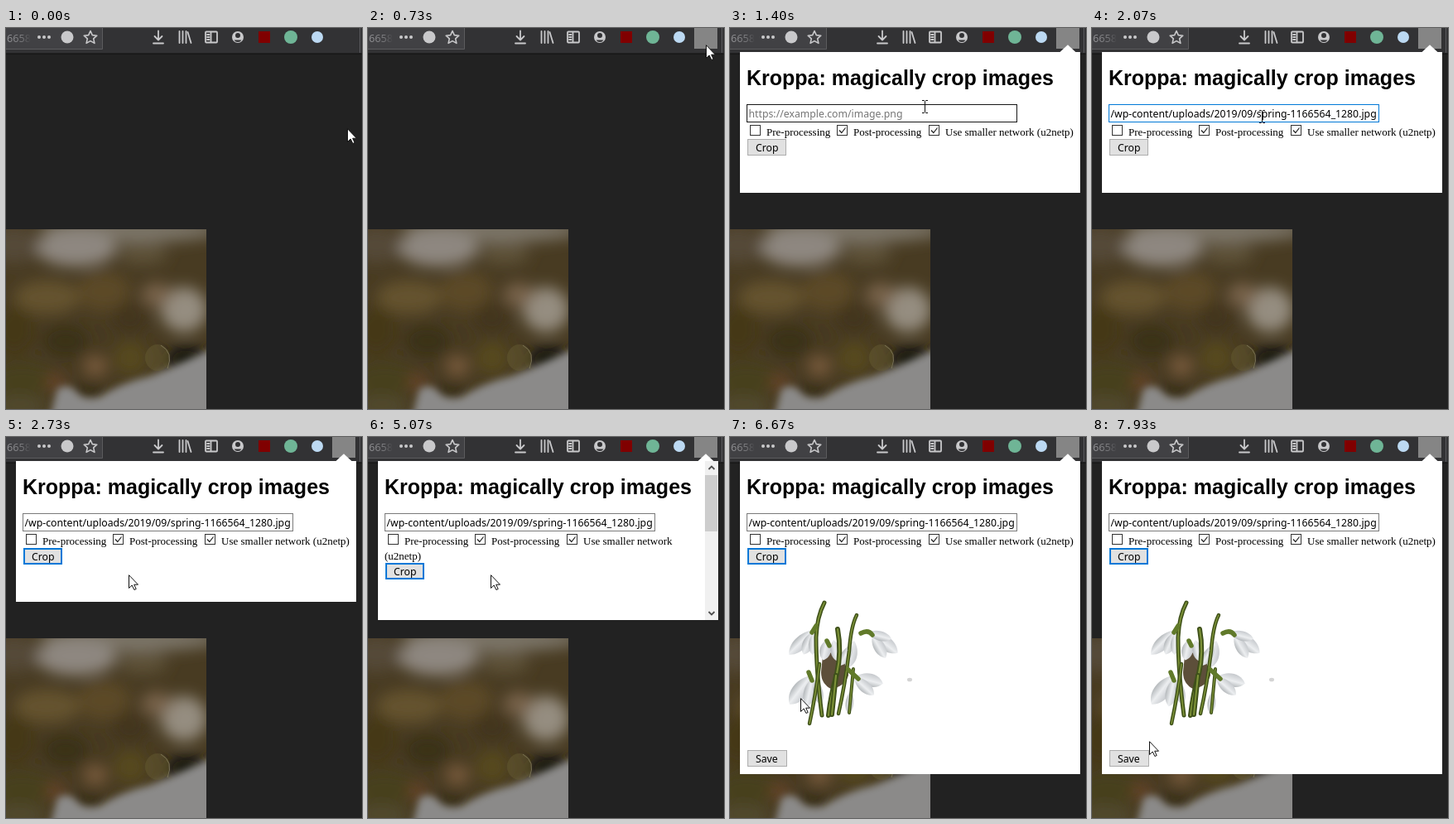
An HTML page for the animation above (8 s loop, 430 by 460 pixels).

```html
<!DOCTYPE html>
<html lang="en">
<head>
<meta charset="utf-8">
<title>Crop popup</title>
<style>
  html, body { margin: 0; width: 100%; height: 100%; overflow: hidden; background: #222; }
  svg { display: block; width: 430px; height: 460px; }
  .ui { font: 12.28px "Noto Sans", "Open Sans", sans-serif; }
  .label { font: 13px "Liberation Serif", "Times New Roman", serif; }
  .title { font: bold 25px "Liberation Sans", Arial, sans-serif; }
  .icon { fill: none; stroke: #c9c9cb; stroke-width: 1.8; stroke-linecap: round; stroke-linejoin: round; }
</style>
</head>
<body>
<svg viewBox="0 0 430 460" xmlns="http://www.w3.org/2000/svg">
  <defs>
    <linearGradient id="fade" gradientUnits="userSpaceOnUse" x1="4" x2="30" y1="0" y2="0">
      <stop offset="0" stop-color="#8d8d90"/><stop offset=".6" stop-color="#77777a"/>
      <stop offset="1" stop-color="#414144"/>
    </linearGradient>
    <linearGradient id="petal" x1="0" x2="1" y1="0" y2="0">
      <stop offset="0" stop-color="#b4b8bb"/><stop offset=".45" stop-color="#eceef0"/>
      <stop offset="1" stop-color="#c6c9cd"/>
    </linearGradient>
    <filter id="blur" x="-50%" y="-50%" width="200%" height="200%"><feGaussianBlur stdDeviation="9"/></filter>
    <filter id="soft" x="-50%" y="-50%" width="200%" height="200%"><feGaussianBlur stdDeviation="5"/></filter>
    <clipPath id="photoBox"><rect y="243" width="242" height="217"/></clipPath>
  </defs>

  <rect width="430" height="460" fill="#222"/>

  <g clip-path="url(#photoBox)">
    <rect y="243" width="242" height="217" fill="#483b22"/>
    <g id="blobs" filter="url(#blur)"></g>
    <path d="M52 475L62 436Q74 428 84 438Q92 450 112 446Q140 428 175 420Q210 406 255 384V475Z" fill="#8b8a89" filter="url(#soft)"/>
    <ellipse cx="183" cy="398" rx="15" ry="16" fill="#6b6238" opacity=".4"/>
    <path d="M187 383Q203 392 195 411" fill="none" stroke="#8a8465" opacity=".7"/>
  </g>

  <g id="toolbar">
    <rect width="430" height="31" fill="#323234"/>
    <rect y="30.5" width="430" height="1" fill="#0e0e0f"/>
    <path d="M0 25.500H116.500V0" fill="#414144" stroke="#5b5b5e"/>
    <rect width="116" height="25" fill="#414144"/>
    <text x="1" y="17" class="ui" style="font-size:12.700px" fill="url(#fade)">6658</text>
    <g fill="#c9c9cb"><circle cx="40" cy="11" r="2"/><circle cx="46" cy="11" r="2"/><circle cx="52" cy="11" r="2"/></g>
    <circle cx="74" cy="11" r="7.5" fill="#c9c9cb"/>
    <path class="icon" style="stroke-width:1.600" d="M102 3.500L104.300 8.600 109.800 9.200 105.700 12.900 106.900 18.400 102 15.600 97.100 18.400 98.300 12.900 94.200 9.200 99.700 8.600Z"/>
    <path class="icon" d="M184 3.500V14M179.500 10L184 14.500 188.500 10M178 18.500H190"/>
    <path class="icon" d="M209.500 4V18M213.500 4V18M217.500 4V18M219.500 5L223.500 18"/>
    <path class="icon" d="M242 4.500H254Q255 4.500 255 5.500V16.500Q255 17.500 254 17.500H242Q241 17.500 241 16.500V5.500Q241 4.500 242 4.500ZM247.500 5V17M243 8H245.500M243 11H245.500M243 14H245.500"/>
    <circle cx="280" cy="11" r="7" fill="#c9c9cb"/>
    <path d="M280 6A3 3 0 0 1 280 12A3 3 0 0 1 280 6M275.500 14.500H284.500Q283 17 280 17Q277 17 275.500 14.500" fill="#323234"/>
    <rect x="305" y="4" width="14" height="14" fill="#800000"/>
    <circle cx="344" cy="11" r="8" fill="#6fb596"/>
    <circle cx="376" cy="11" r="7" fill="#bcd9f2"/>
    <rect id="tool" x="394" width="28" height="25"/>
    <path d="M427.500 0V30" stroke="#5c5c5f"/>
  </g>

  <g id="panel">
    <path d="M397.500 30L408 20.200 418.500 30Z" fill="#fff"/>
    <rect id="sheet" y="29" fill="#fff"/>
    <text x="20" y="69" class="title">Kroppa: magically crop images</text>
    <rect id="field" x="20.500" y="92.500" width="326" height="21" fill="#fff"/>
    <text id="value" x="22.500" y="108" class="ui"></text>
    <path id="caret" d="M23.500 96V111" stroke="#000"/>
    <g id="checks"></g>
    <text x="44" y="130" class="label">Pre-processing</text>
    <text x="149" y="130" class="label">Post-processing</text>
    <text x="260" y="130" class="label">Use smaller network<tspan id="tail"> (u2netp)</tspan></text>
    <text id="wrapped" x="20" y="148" class="label">(u2netp)</text>
    <g id="crop"><rect/><text x="31" y="149" class="ui">Crop</text></g>
    <g id="result">
      <g id="flowers"></g>
      <g id="save"><rect/><text x="31" y="393" class="ui">Save</text></g>
    </g>
    <g id="scroll">
      <rect x="407" y="29" width="16" height="192" fill="#f0f0f0"/>
      <rect x="407" y="46" width="15" height="68" fill="#cdcdcd"/>
      <path d="M411.500 39L415 35.500 418.500 39M411.500 211L415 214.500 418.500 211" fill="none" stroke="#505050" stroke-width="1.800"/>
    </g>
  </g>

  <path id="arrow" d="M.5 .7V16.500L4.200 13 6.900 18.500 9.200 17.500 6.700 12.200H11.500Z" fill="#fff" stroke="#111"/>
  <path id="beam" d="M-3.500 -7.500H-1L0 -6.500 1 -7.500H3.500M0 -6.500V6.500M-3.500 7.500H-1L0 6.500 1 7.500H3.500" fill="none" stroke="#111"/>
</svg>

<script>
const $ = id => document.getElementById(id);
const set = (el, attrs) => { for (const a in attrs) el.setAttribute(a, attrs[a]); };
const show = (id, on) => set($(id), { visibility: on ? 'inherit' : 'hidden' });
const add = (parent, tag, attrs) => {
  const el = document.createElementNS('http://www.w3.org/2000/svg', tag);
  set(el, attrs);
  parent.appendChild(el);
};

// Blurred background photo: x, y, rx, ry, colour
[
  [10, 262, 30, 22, '#554a39'], [150, 244, 110, 15, '#7c7467'], [85, 266, 48, 22, '#8e8780'],
  [165, 272, 30, 14, '#5d5138'], [50, 325, 40, 20, '#65522f'], [118, 318, 32, 24, '#5b4926'],
  [150, 350, 22, 20, '#42361a'], [215, 340, 28, 27, '#958d80'], [182, 322, 18, 14, '#79644b'],
  [10, 365, 26, 30, '#453719'], [72, 378, 28, 20, '#3a3015'], [108, 408, 14, 12, '#7a5c3c'],
  [150, 398, 20, 20, '#57491f'], [218, 400, 24, 17, '#18130b'], [20, 425, 40, 22, '#47401b'],
  [60, 428, 12, 9, '#6c442b'], [100, 438, 18, 8, '#322b15'], [15, 458, 35, 14, '#514a2e']
].forEach(([cx, cy, rx, ry, fill]) => add($('blobs'), 'ellipse', { cx, cy, rx, ry, fill }));

[24, 129, 240].forEach((x, i) => {
  add($('checks'), 'rect', { x: x + .5, y: 117.5, width: 12, height: 12, fill: '#fff', stroke: '#333' });
  if (i) add($('checks'), 'path', { d: `M${x + 3} 123.500l2.800 3 4.700 -6`, fill: 'none', stroke: '#222', 'stroke-width': 1.2 });
});

// Cut-out flowers
const flowers = $('flowers');
add(flowers, 'path', { d: 'M112 264Q126 256 141 262L143 288Q138 302 122 304Q110 298 110 284Z', fill: '#5d4f3a' });
// Petals: base x, base y, length, width, angle
[
  [101, 233, 42, 16, 45], [101, 235, 30, 14, 24], [101, 236, 27, 11, 3],
  [118, 244, 26, 14, 12], [125, 245, 26, 12, -10], [150, 246, 34, 16, 14], [148, 250, 30, 12, 30],
  [171, 236, 40, 17, -52], [172, 239, 32, 14, -30], [166, 236, 30, 12, -75],
  [99, 288, 44, 20, 38], [100, 291, 35, 15, 12], [103, 292, 32, 12, -12],
  [152, 289, 34, 16, -75], [150, 290, 32, 14, -48], [146, 306, 29, 10, 6]
].forEach(([x, y, l, w, a]) => add(flowers, 'path', {
  d: `M0 0C${w * .65} ${l * .3} ${w * .65} ${l * .8} 0 ${l}C${-w * .65} ${l * .8} ${-w * .65} ${l * .3} 0 0Z`,
  transform: `translate(${x} ${y}) rotate(${a})`, fill: 'url(#petal)'
}));
const stem = (d, width, stroke) =>
  add(flowers, 'path', { d, fill: 'none', stroke, 'stroke-width': width, 'stroke-linecap': 'round' });
[
  ['M114 200Q105 217 104 242Q104 282 111 336', 5],
  ['M153 215Q146 229 144 258Q139 299 131 334', 4.5],
  ['M130 232Q135 259 129 286Q122 310 119 336', 6],
  ['M108 274Q104 309 96 346', 4.5],
  ['M128 288L123 335', 6], ['M149 280L144 333', 4]
].forEach(([d, w]) => { stem(d, w, '#3f511a'); stem(d, w * .35, '#7d9238'); });
['M104 228L99 236', 'M158 237Q167 232 172 239', 'M95 284L99 294', 'M143 281L155 292', 'M117 246L120 252']
  .forEach(d => stem(d, 5.5, '#617a2a'));
add(flowers, 'ellipse', { cx: 217, cy: 293, rx: 3, ry: 2.3, fill: '#d4d4d4' });

// Pointer path: step, x, y
const path = [
  [0, 412, 121], [9, 408, 22], [11, 408, 20], [15, 408, 20], [21, 235, 95], [25, 228, 106],
  [31, 205, 107], [38, 52, 149], [41, 148, 166], [90, 148, 166], [100, 85, 315], [103, 70, 358],
  [106, 62, 382], [118, 62, 382], [119, 69, 367]
];
function pointer(k) {
  let i = 0;
  while (i < path.length - 2 && path[i + 1][0] <= k) i++;
  const [a, ax, ay] = path[i], [b, bx, by] = path[i + 1];
  const u = Math.min(1, (k - a) / (b - a));
  return [Math.round(ax + (bx - ax) * u), Math.round(ay + (by - ay) * u)];
}

const looks = {
  idle: ['#e1e1e1', '#adadad', 1], hover: ['#e5f1fb', '#0078d7', 1],
  press: ['#cce4f7', '#005499', 1], focus: ['#e1e1e1', '#0078d7', 2]
};
function button(id, y, width, look) {
  const [fill, stroke, w] = looks[look];
  set($(id).firstElementChild, {
    fill, stroke, 'stroke-width': w, width: width - w, height: 20 - w, x: 21 + w / 2, y: y + w / 2
  });
}

const FADE_START = 13, CLICK = 26, PASTE = 30, PRESS = 37, RELEASE = 40, GROW = 76;
const fades = [.12, .49, .85, 1];

function render(k) {
  const [x, y] = pointer(k);
  const over = (l, t, r, b) => x >= l && x < r && y >= t && y < b;
  const open = k >= FADE_START;
  const inField = open && over(20, 92, 347, 114);

  show('arrow', !inField);
  show('beam', inField);
  set($('arrow'), { transform: `translate(${x} ${y})` });
  set($('beam'), { transform: `translate(${x + .5} ${y})` });
  set($('tool'), { fill: k >= 11 ? '#858585' : k >= 9 ? '#555557' : 'none' });

  const step = Math.max(0, Math.min(3, k - FADE_START));
  show('panel', open);
  set($('panel'), { opacity: fades[step], transform: `translate(0 ${[-2, -1, 0, 0][step]})` });

  const wrap = k === GROW || k === GROW + 1;
  const bottom = k < GROW ? 199 : k === GROW ? 221 : k === GROW + 1 ? 443 : 407;
  const left = k === GROW + 1 ? 8 : 12;
  const shift = `translate(0 ${wrap ? 18 : 0})`;
  set($('sheet'), { x: left, width: 423 - left, height: bottom - 29 });
  show('scroll', k === GROW);
  show('tail', !wrap);
  show('wrapped', wrap);
  show('result', k > GROW);
  set($('result'), { transform: shift });
  set($('crop'), { transform: shift });

  const focused = k >= CLICK && k < PRESS, pasted = k >= PASTE;
  set($('field'), { stroke: focused ? '#0078d7' : inField ? '#171717' : '#7a7a7a' });
  $('value').textContent = pasted
    ? '/wp-content/uploads/2019/09/spring-1166564_1280.jpg' : 'https://example.com/image.png';
  set($('value'), { fill: pasted ? '#000' : '#757575' });
  show('caret', focused && !pasted);

  button('crop', 134, 47, k >= RELEASE ? 'focus' : k >= PRESS ? 'press' : 'idle');
  button('save', 378, 48, k > GROW && over(21, 370, 69, 398) ? 'hover' : 'idle');
}

const LOOP = 8000, STEP = 200 / 3;
const start = performance.now();
let last = -1;
function tick() {
  const t = (performance.now() - start) % LOOP;
  const k = Math.min(119, Math.floor((t + 3.4) / STEP));
  if (k !== last) render(last = k);
  requestAnimationFrame(tick);
}
tick();
</script>
</body>
</html>
```
